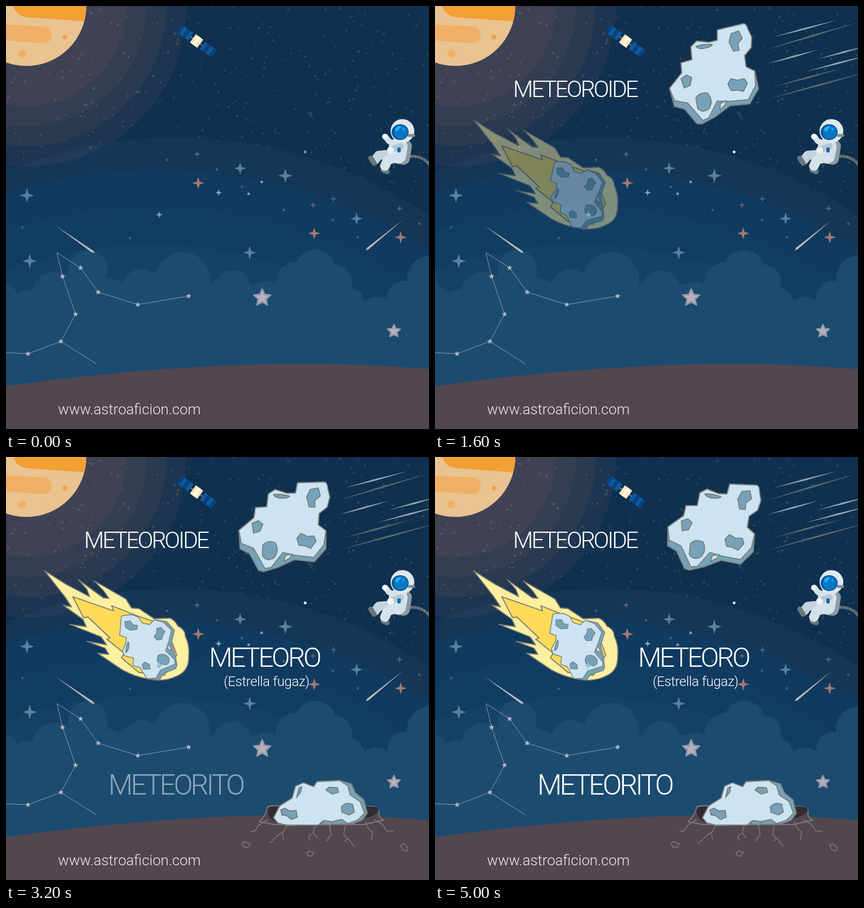
An HTML page for the animation above (5.2 s loop, 748 by 748 pixels).

```html
<!DOCTYPE html>
<html lang="es">
<head>
<meta charset="utf-8">
<title>Meteoroide, meteoro, meteorito</title>
<style>
  html, body { margin: 0; width: 100%; height: 100%; overflow: hidden; background: #10304f; }
  svg { display: block; width: 100vw; height: 100vh; }
  text { font-family: Roboto, "Open Sans", sans-serif; font-weight: 300; fill: #fff; }
  .title { letter-spacing: -.075em; }
  .ink { stroke: #7b7b75; stroke-width: 1.8; stroke-linejoin: round; }
  .line { fill: none; stroke: #7b7b75; stroke-width: 1.5; stroke-linejoin: round; }
  .ice { fill: #cce3f1; }
  .shade { fill: #75a2ba; }
</style>
</head>
<body>
<svg viewBox="0 0 748 748">
  <defs>
    <g id="rock">
      <path class="ink shade" d="M513 45L561 42Q566 43 567 54L571 68L567 86L553 98L552 118L566 128L567 160L547 184L512 181L482 196L458 204L449 202L432 173L415 165L412 132L438 109L440 91L460 89L462 66L474 58L495 64L510 63Z"/>
      <path class="ink ice" d="M513 45L561 42Q566 43 567 54L571 68L567 86L553 98L552 118L566 128L563 153L546 176L512 173L491 169L471 196L460 198L439 163L417 155L412 132L438 109L440 91L460 89L462 66L474 58L495 64L510 63Z"/>
      <g class="ink shade">
        <path d="M530 70L536 56L550 53L554 67L545 75L545 87L535 87Z"/>
        <path d="M435 119L446 114L454 120L449 133L438 136Z"/>
        <path d="M455 157Q463 147 477 152Q486 168 474 180Q462 186 455 176Z"/>
        <path d="M515 143L522 134L533 139L545 138L549 147L540 160L530 156L519 155Z"/>
        <path d="M471 67Q484 65 500 69Q498 73 483 73Q474 72 471 67Z"/>
        <path class="ice" d="M493 185L496 174L507 171L504 178Z"/>
      </g>
    </g>
  </defs>

  <rect width="748" height="748" fill="#10304f"/>
  <g id="dust" fill="#4d7580"></g>
  <g id="domes"></g>
  <g id="halos" fill="#dc8468" fill-opacity=".062"></g>
  <g id="haloDust" fill="#7d8078"></g>

  <g id="sun">
    <circle cx="36" cy="0" r="106" fill="#e9c390"/>
    <path fill="#f29f34" d="M13 0Q18 18 39 20L138 27A106 106 0 0 0 142 0Z"/>
    <path fill="#efb066" d="M0 33L66 36A15 15 0 0 1 66 66L0 61Z"/>
    <circle cx="104" cy="55" r="4" fill="#f0a343"/>
    <circle cx="29" cy="84" r="7" fill="#efb066"/>
  </g>

  <g id="satellite" transform="translate(337 62) rotate(36)">
    <path stroke="#a9b6bf" stroke-width="1" d="M-14 0H14"/>
    <path fill="#0b5c9f" d="M-38 -8H-13V8H-38ZM13 -8H38V8H13Z"/>
    <path fill="#0b427d" d="M-38 -8H-32V8H-38ZM-26 -8H-19V8H-26ZM19 -8H26V8H19ZM32 -8H38V8H32Z"/>
    <rect x="-8" y="-9" width="16" height="18" fill="#fbe6bd"/>
    <path fill="#fff6e0" d="M-3 -9H3V9H-3Z"/>
  </g>

  <g id="clouds" fill="#1b4b6f"><path d="M0 510L60 500L110 480H180L220 492H480L600 495L640 525L748 510V748H0Z"/></g>
  <g id="sky"></g>
  <path fill="#52464f" d="M0 672Q290 632 535 633Q640 633 748 642V748H0Z"/>

  <g id="astronaut" stroke-linecap="round">
    <path d="M714 266Q737 264 750 282" fill="none" stroke="#69747a" stroke-width="5"/>
    <path d="M714 266Q737 264 750 282" fill="none" stroke="#444f57" stroke-width="5" stroke-dasharray="1 5" stroke-linecap="butt"/>
    <rect x="684" y="236" width="32" height="44" rx="11" transform="rotate(9 700 258)" fill="#8b9ba3"/>
    <path d="M682 262L659 264L653 272" fill="none" stroke="#c3d3dd" stroke-width="16" stroke-linejoin="round"/>
    <path d="M645 269L651 278M667 290L674 293" stroke="#69767e" stroke-width="9"/>
    <path d="M690 268L675 272L670 283" fill="none" stroke="#d5e2e9" stroke-width="17" stroke-linejoin="round"/>
    <rect x="676" y="235" width="33" height="43" rx="13" transform="rotate(10 693 255)" fill="#d5e1e8"/>
    <path d="M687 244L677 239L671 231" fill="none" stroke="#d5e2e9" stroke-width="10" stroke-linejoin="round"/>
    <path d="M698 248L681 254" stroke="#b5c7d1" stroke-width="11"/>
    <circle cx="680" cy="255" r="6" fill="#edf3f6"/>
    <circle cx="670" cy="231" r="5" fill="#edf3f6"/>
    <rect x="692" y="250" width="6" height="9" rx="2" fill="#0b69b4"/>
    <circle cx="701" cy="221" r="21" fill="#dfe8ec"/>
    <path d="M713 229H721" stroke="#7d8b93" stroke-width="5"/>
    <ellipse cx="697" cy="223" rx="15" ry="14" fill="#085a9f"/>
    <ellipse cx="698" cy="223" rx="12" ry="12" fill="#0876c5"/>
    <path d="M688 218Q692 211 699 213L691 223ZM701 215L705 218L702 221Z" fill="#20b4f4"/>
  </g>

  <text x="92" y="722" font-size="25.7" style="fill:#eee9ec">www.astroaficion.com</text>

  <g id="meteoroid">
    <g id="streaks"></g>
    <use href="#rock" id="asteroid"/>
  </g>
  <text class="title" id="meteoroidText" x="138" y="161" font-size="41">METEOROIDE</text>

  <g id="meteor">
    <path class="ink" fill="#fbefa0" d="M68 201L106 225L148 247L143 234L128 217L172 249L182 250L173 237L156 219L212 251L222 267L235 268L262 286L290 285Q299 289 304 299Q317 305 317 317Q325 333 323 352Q324 378 303 387Q281 398 255 393Q228 389 205 376L162 347L182 349L175 338L143 326L178 332L168 318L113 296L142 300L136 287L101 262L116 265L104 247Z"/>
    <path class="ink" fill="#fddb59" d="M118 247L190 272L187 263L230 280L283 299L302 350L280 386L235 381L204 355L209 347L178 322L184 320L145 283L137 284Z"/>
    <use href="#rock" id="meteorRock"/>
    <path fill="#91c2df" d="M271 363L273 367L277 369L273 371L271 375L269 371L265 369L269 367Z"/>
  </g>
  <g id="meteorText">
    <text class="title" x="359" y="371" font-size="48">METEORO</text>
    <text x="385" y="405" font-size="24" letter-spacing="-.4">(Estrella fugaz)</text>
  </g>

  <g id="meteorite">
    <path class="ink" fill="#52464f" d="M448 645Q459 635 463 618Q475 615 500 618H645Q657 617 660 627Q657 637 668 642L633 650H475Z"/>
    <path fill="#302a32" d="M463 621Q470 617 500 618H645Q657 617 659 624Q655 634 637 638L610 650H488Q460 642 463 621Z"/>
    <path class="ink shade" d="M473 638L484 617L506 603L512 582L526 576L544 583L550 574L590 572L611 578L618 594L633 606L639 630L630 642L612 649L497 652L481 648Z"/>
    <path class="ink ice" d="M473 638L484 617L506 603L512 582L526 576L544 583L550 574L590 572L604 581L609 598L626 609L634 630L622 642L604 648L594 641L576 645L560 644L552 651L497 651L481 647Z"/>
    <g class="ink shade">
      <path d="M566 589L571 584L586 585L588 593L577 596Z"/>
      <path d="M593 619Q600 609 613 614L616 628L607 633L594 628Z"/>
      <path d="M486 624L493 621L502 626L513 625L515 637L505 641L496 634L488 633Z"/>
      <path d="M514 602L518 585L523 583L521 593Z"/>
      <path d="M557 649L563 643L576 645L574 651Z"/>
    </g>
    <g class="line">
      <path d="M463 641L447 651L440 661L432 663M496 653L490 663L482 668L466 683M489 665L491 677"/>
      <path d="M547 652L543 665L535 671L538 679M544 665L550 674M572 652L575 668L566 680M600 652L597 668L608 678L616 689M604 675L598 680"/>
      <path d="M635 644L641 657L648 663L646 678M651 641L665 649L673 661L685 662"/>
      <path d="M417 683L422 680L432 684L428 690L421 690ZM532 700L537 697L545 699L540 706L534 705ZM698 686L704 684L711 691L709 697L701 694Z"/>
    </g>
  </g>
  <text class="title" id="meteoriteText" x="181" y="597" font-size="50">METEORITO</text>
</svg>

<script>
const el = id => document.getElementById(id);

function add(parent, tag, attrs) {
  const node = document.createElementNS(el("sky").namespaceURI, tag);
  for (const name in attrs) node.setAttribute(name, attrs[name]);
  el(parent).append(node);
  return node;
}
const circle = (parent, cx, cy, r, more) => add(parent, "circle", { cx, cy, r, ...more });

let seed = 7;
const random = () => (seed = seed * 16807 % 2147483647) / 2147483647;

function star(x, y, r, spikes, inner, attrs) {
  const points = Array.from({ length: spikes * 2 }, (_, i) => {
    const a = i * Math.PI / spikes - Math.PI / 2, d = i % 2 ? r * inner : r;
    return [x + d * Math.cos(a), y + d * Math.sin(a)].map(v => v.toFixed(1));
  });
  add("sky", "polygon", { points: points.join(" "), ...attrs });
}

// A thin sliver, widest at the given share of its length.
function sliver(parent, [x1, y1, x2, y2], width, peak, fill) {
  const length = Math.hypot(x2 - x1, y2 - y1);
  const nx = (y2 - y1) / length * width / 2, ny = (x1 - x2) / length * width / 2;
  const mx = x1 + (x2 - x1) * peak, my = y1 + (y2 - y1) * peak;
  add(parent, "polygon", { fill, points: [x1, y1, mx + nx, my + ny, x2, y2, mx - nx, my - ny].join(" ") });
}

function drawBackground() {
  for (let i = 0; i < 620; i++) {
    const x = random() * 748, y = random() * 390, big = random() < .2;
    const nearSun = Math.hypot(x - 36, y) < 284;
    if (nearSun || y < 350)
      circle(nearSun && y < 270 ? "haloDust" : "dust", x, y, big ? 2.4 : .7 + random() * .9, { opacity: big ? .32 : .45 });
  }
  [[300, 233, 800, "#143657"], [265, 290, 890, "#103a5f"], [260, 355, 825, "#123d62"], [255, 422, 758, "#154166"]]
    .forEach(([x, top, r, fill]) => circle("domes", x, top + r, r, { fill }));
  [177, 213, 248, 284].forEach(r => circle("halos", 36, 0, r));
  [[145, 466, 35], [86, 510, 40], [240, 500, 35], [312, 484, 49], [400, 500, 33], [460, 518, 31],
   [512, 488, 35], [547, 467, 36], [580, 489, 32], [655, 548, 34], [704, 516, 30], [750, 482, 41],
   [-8, 518, 29], [38, 530, 28], [600, 530, 35]].forEach(c => circle("clouds", ...c));
}

function drawStars() {
  const blue = "#58809f", tan = "#a17a72", pale = "#84a9c4", dimBlue = "#385f85", dimTan = "#665b68";
  [[37, 335, 13, blue], [42, 451, 13, blue], [414, 287, 11, blue], [494, 300, 13, blue], [620, 376, 11, blue],
   [431, 436, 12, blue], [340, 313, 11, tan], [545, 402, 11, tan], [698, 409, 11, tan], [376, 330, 6, pale],
   [271, 369, 6, pale], [579, 341, 7, dimBlue], [338, 262, 6, dimTan], [543, 352, 6, dimTan], [696, 358, 6, dimTan]]
    .forEach(([x, y, r, fill]) => star(x, y, r, 4, .32, { fill }));
  [[285, 272], [373, 289], [417, 320], [491, 361], [578, 378], [622, 409], [219, 410], [29, 391], [731, 385]]
    .forEach(([x, y]) => circle("sky", x, y, 2.3, { fill: "#3b6180" }));
  [[429, 332], [452, 311]].forEach(([x, y]) => circle("sky", x, y, 2.5, { fill: "#7995ab" }));

  sliver("sky", [87, 388, 157, 437], 4, .94, "#b8b8b8");
  sliver("sky", [702, 378, 636, 432], 4, .94, "#b8b8b8");

  add("sky", "path", {
    d: "M160 633L97 593L39 615L0 613M97 593L123 545L100 478L90 436L132 463L163 506L233 528L323 513",
    fill: "none", stroke: "#98a3b3", "stroke-width": .9
  });
  [[97, 593], [39, 615], [123, 545], [100, 478], [132, 463], [163, 506], [233, 528], [323, 513]]
    .forEach(([x, y]) => star(x, y, 5, 5, .45, { fill: "#b9b5c5" }));
  [[453, 516, 16], [686, 575, 12]].forEach(([x, y, r]) => {
    star(x, y, r, 5, .48, { fill: "#9c98a9", stroke: "#9c98a9", "stroke-width": 2, "stroke-linejoin": "round" });
    star(x, y, r * .75, 5, .42, { fill: "#b8b1be" });
  });
}

function drawStreaks() {
  const pale = "#93a6b2", dim = "#63696e";
  [[598, 55, 711, 25, pale], [586, 77, 744, 30, dim], [588, 102, 679, 77, pale], [676, 94, 770, 69, pale],
   [656, 116, 770, 86, pale], [598, 143, 720, 110, dim], [587, 165, 770, 115, dim]]
    .forEach(([x1, y1, x2, y2, fill]) => sliver("streaks", [x1, y1, x2, y2], 3, .5, fill));
}

drawBackground();
drawStars();
drawStreaks();
const twinkle = circle("sky", 529, 258, 2.5);

// Rocking angles as [step, degrees].
const asteroidSwing = [[0, 9], [2, 10], [6, 0], [8, -10], [11, 6], [13, 10], [14, 9], [18, -5.5], [19, -10], [21, 0], [23.5, 10], [25, 6]];
const meteorSwing = [[7, -78], [9, -71], [11, -84], [14, -92], [18, -71], [19, -70], [21, -77], [23, -87], [25, -77]];

function sample(keys, step) {
  const next = keys.findIndex(key => key[0] >= step);
  if (next <= 0) return keys[0][1];
  const [s0, a0] = keys[next - 1], [s1, a1] = keys[next];
  return a0 + (a1 - a0) * (step - s0) / (s1 - s0);
}

const LOOP = 5200, STEP = 200;
const sections = [["meteoroid", 200], ["meteor", 1400], ["meteorite", 2600]];
const fade = (id, amount) => el(id).setAttribute("opacity", Math.min(1, Math.max(0, amount)));

function render(now) {
  const step = Math.floor(now % LOOP / STEP), time = step * STEP;
  for (const [id, start] of sections) {
    fade(id, time < start ? 0 : (time - start + 100) / 650);
    fade(id + "Text", (time - start - 300) / 600);
  }
  el("asteroid").setAttribute("transform", `rotate(${sample(asteroidSwing, step)} 491 124)`);
  el("meteorRock").setAttribute("transform",
    `translate(252 338) rotate(${sample(meteorSwing, step)}) scale(.68) translate(-491 -124)`);
  twinkle.setAttribute("fill", time < 200 ? "#8197a9" : "#dce9f2");
}

const begin = performance.now();
function tick() {
  render(performance.now() - begin);
  requestAnimationFrame(tick);
}
tick();
</script>
</body>
</html>
```
